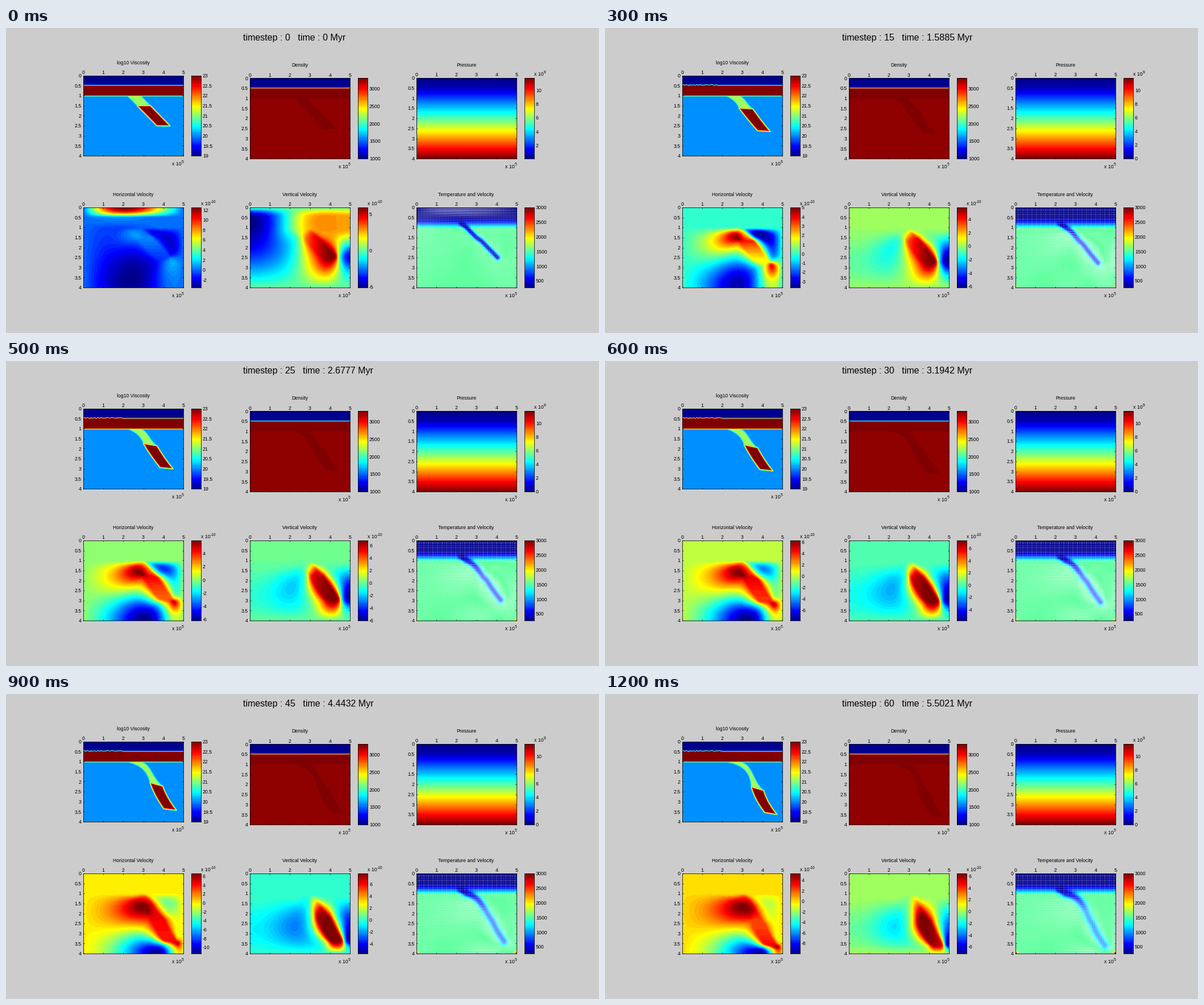
A matplotlib script that plays this animation: 1043 by 537 pixels, repeating every 1.3 s.

```python
from functools import lru_cache

import numpy as np
import matplotlib.pyplot as plt
from matplotlib.animation import FuncAnimation
from matplotlib.collections import LineCollection
from matplotlib.colors import ListedColormap

W, H, DPI = 1043, 537, 64
PX = 72 / DPI
NX, NY = 80, 64
LX, LY = 5.0, 4.0
TIMES = [0, .49918, 1.0439, 1.5885, 2.1331, 2.6777, 3.1942,
         3.6816, 4.0706, 4.4432, 4.8020, 5.1530, 5.5021]

# slab corners: top left, top right, bottom right, bottom left
SLAB_STEPS = [0, 5, 15, 35, 45, 60]
SLAB = np.array([
    [2.70, 1.50, 3.35, 1.50, 4.32, 2.50, 3.68, 2.50],
    [2.73, 1.53, 3.38, 1.53, 4.34, 2.61, 3.72, 2.58],
    [2.84, 1.62, 3.52, 1.66, 4.38, 2.78, 3.76, 2.74],
    [3.18, 1.87, 3.84, 2.05, 4.56, 3.21, 3.92, 3.13],
    [3.34, 2.05, 3.96, 2.22, 4.64, 3.42, 4.02, 3.34],
    [3.45, 2.26, 4.06, 2.44, 4.72, 3.63, 4.12, 3.53]])

# colour limits of the two velocity panels
LIM_STEPS = [0, 5, 15, 25, 35, 45, 60]
VX_LO = [-3.54, -2.63, -3.64, -6.17, -9.37, -11.4, -9.95]
VX_HI = [12.5, 3.99, 5.01, 5.98, 6.68, 6.64, 5.3]
VY_LO = [-5.1, -6.33, -6.17, -6.02, -5.57, -5.6, -7.15]
VY_HI = [5.9, 5.14, 5.78, 6.82, 7.75, 7.8, 6.45]


def jet64():
    i = np.arange(1, 65)

    def ramp(j):
        return np.clip(np.minimum(j, 48 - j) / 16, 0, 1)
    return ListedColormap(np.column_stack([ramp(i - 24), ramp(i - 8), ramp(i + 8)]))


JET = jet64()


# ---------- geometry ----------
def bezier(p0, p1, p2, p3, n=12):
    t = np.linspace(0, 1, n)[:, None]
    p0, p1, p2, p3 = map(np.asarray, (p0, p1, p2, p3))
    return ((1 - t)**3 * p0 + 3 * t * (1 - t)**2 * p1
            + 3 * t**2 * (1 - t) * p2 + t**3 * p3)


def mix(a, b, u):
    return np.asarray(a) * (1 - u) + np.asarray(b) * u


def edges(step):
    """Left and right edges of the weak neck and of the stiff slab."""
    u = step / 60
    c = [np.interp(step, SLAB_STEPS, col) for col in SLAB.T]
    tl, tr, br, bl = np.reshape(c, (4, 2))
    s = np.linspace(0, 1, 7)[:, None]
    sag = np.array([.08 * u, 0]) * 4 * s * (1 - s)
    neck_l = bezier((2.2, 1.0), mix((2.37, 1.17), (3.0, 1.15), u),
                    mix((2.53, 1.33), (3.4, 1.45), u), tl)
    neck_r = bezier((2.87, 1.0), mix((3.02, 1.17), (3.55, 1.15), u),
                    mix((3.18, 1.33), (3.5, 2.0), u), tr)
    return neck_l, neck_r, mix(tl, bl, s) - sag, mix(tr, br, s) - sag


def seg_dist(x, y, a, b):
    e = b - a
    t = np.clip(((x - a[0]) * e[0] + (y - a[1]) * e[1]) / (e @ e + 1e-12), 0, 1)
    return np.hypot(x - a[0] - t * e[0], y - a[1] - t * e[1])


def signed_dist(x, y, poly):
    d = np.full(x.shape, 99.0)
    inside = np.zeros(x.shape, bool)
    for a, b in zip(poly, np.roll(poly, -1, axis=0)):
        d = np.minimum(d, seg_dist(x, y, a, b))
        dy = b[1] - a[1]
        if dy:
            cross = (a[1] > y) != (b[1] > y)
            inside ^= cross & (x < a[0] + (y - a[1]) * (b[0] - a[0]) / dy)
    return np.where(inside, -d, d)


def cover(d, width):
    return np.clip(.5 - d / width, 0, 1)


def bodies(x, y, step):
    neck_l, neck_r, left, right = edges(step)
    neck = signed_dist(x, y, np.vstack([neck_l, neck_r[::-1]]))
    slab = signed_dist(x, y, np.vstack([left, right[::-1]]))
    return neck, slab


def log_viscosity(x, y, neck, slab, surface=.5):
    v = 20.05 + 1.05 * cover(neck, .08)
    v = np.maximum(v, 20.05 + 2.95 * cover(slab, .1))
    v = np.maximum(v, 20.05 + 2.95 * cover(y - 1.01, .06))
    return 19 + (v - 19) * cover(surface - y, .06)


def temperature(x, y, step):
    u = step / 60
    t = 273 + 1270 * np.clip((y - .5) / .53, 0, 1)**1.4
    neck_l, neck_r, left, right = edges(step)
    line = np.vstack([[(2.25, .8)], .55 * neck_l + .45 * neck_r,
                      (.42 * left + .58 * right)[1:]])
    d = np.full(x.shape, 99.0)
    for a, b in zip(line[:-1], line[1:]):
        d = np.minimum(d, seg_dist(x, y, a, b))
    depth = np.clip((y - .9) / 1.0, 0, 1)
    amp = 1150 - 560 * u * depth
    t = t - amp * np.exp(-(d / (.12 + .08 * u))**2) * np.clip(t / 1543, 0, 1)
    for cx in (0, LX):
        t = t + 1500 * u * np.exp(-((x - cx)**2 + (y - LY)**2) / .008)
    return np.maximum(t, 273)


# ---------- slow viscous flow, stream function ----------
def stream(eta, rho, pen):
    n = NY - 1
    eye = np.eye(n)
    lap = np.eye(n, k=1) + np.eye(n, k=-1) - 2 * eye
    diff = np.eye(n + 1, n) - np.eye(n + 1, n, -1)
    stretch = np.hstack([eye, -2 * eye - lap, eye])
    shear = 2 * np.hstack([-diff, diff, 0 * diff])
    lg = np.log(eta)
    cell = np.exp((lg[1:, 1:] + lg[:-1, 1:] + lg[1:, :-1] + lg[:-1, :-1]) / 4)

    a, b = np.zeros((3 * n, 3 * n)), np.zeros(3 * n)
    a[:n, :n] = 1e9 * eye
    mid = np.arange(n, 2 * n)
    parts = []
    for k in range(NX - 1):
        a += stretch.T @ (eta[k + 1, 1:-1, None] * stretch)
        a += shear.T @ (cell[k][:, None] * shear)
        a[mid, mid] += pen
        b[:n] -= rho[k + 1, 1:-1]
        b[2 * n:] += rho[k + 1, 1:-1]
        s = np.linalg.solve(a[:n, :n], np.column_stack([a[:n, n:], b[:n]]))
        parts.append(s)
        rest = np.column_stack([a[n:, n:], b[n:]]) - a[n:, :n] @ s
        a, b = np.zeros_like(a), np.zeros_like(b)
        a[:2 * n, :2 * n], b[:2 * n] = rest[:, :-1], rest[:, -1]

    psi = np.zeros((NX + 1, NY + 1))
    last = a[:n, :n] + 4 * diff.T @ (cell[-1][:, None] * diff)
    psi[NX - 1, 1:-1] = np.linalg.solve(last, b[:n])
    for k in range(NX - 2, -1, -1):
        s = parts[k]
        psi[k, 1:-1] = s[:, -1] - s[:, :-1] @ np.r_[psi[k + 1, 1:-1], psi[k + 2, 1:-1]]
    return psi


def fit(v, lo, hi):
    """Scale each sign on its own so that zero keeps its colour."""
    return np.where(v > 0, v * hi / v.max(), v * lo / v.min())


GX, GY = np.meshgrid(np.linspace(0, LX, NX + 1), np.linspace(0, LY, NY + 1), indexing='ij')
FX, FY = np.meshgrid((np.arange(176) + .5) / 176 * LX, (np.arange(141) + .5) / 141 * LY)
ROUGH = np.random.default_rng(4).random(60).repeat(3)[:176]
PRESSURE = np.interp(FY, [0, .5, 4], [0, .49, 11.85])
PRESSURE[:, 0] *= .5


@lru_cache(maxsize=None)
def state(k):
    step = 5 * k
    neck, slab = bodies(GX, GY, step)
    eta = 10**(log_viscosity(GX, GY, neck, slab) - 20)
    rho = np.maximum(cover(neck, .08), cover(slab, .08)) * (GY > .99)
    # once settled, the plate stays at rest
    pen = np.where(GY[0, 1:-1] < 1.001, 1e6 if k else 0, 0)
    psi = stream(eta, rho, pen)
    vx, vy = -np.gradient(psi, axis=1), np.gradient(psi, axis=0)
    lims = [np.interp(step, LIM_STEPS, v) for v in (VX_LO, VX_HI, VY_LO, VY_HI)]

    neck, slab = bodies(FX, FY, step)
    reach = 1.4 + .6 * min(step / 25, 1)
    surface = .48 - (.035 * ROUGH * (FX < reach) if k else 0)
    visc = log_viscosity(FX, FY, neck, slab, surface)
    heavy = np.maximum.reduce([cover(neck, .06), cover(slab, .06), cover(FY - 1, .04)])
    dens = 1000 + (2250 + 55 * heavy) * cover(.5 - FY, .07)
    return (visc, dens, fit(vx, *lims[:2]).T, fit(vy, *lims[2:]).T,
            temperature(FX, FY, step), lims)


# ---------- figure ----------
fig = plt.figure(figsize=(W / DPI, H / DPI), dpi=DPI, facecolor='#cccccc')


def text(x, y, s, size=8.8, ha='left'):
    return fig.text(x / W, 1 - y / H, s, fontsize=size * PX, ha=ha, va='baseline',
                    family='Liberation Sans', color='black')


def power(x, y, exp):
    text(x, y, 'x 10')
    text(x + 16.5, y - 4.5, exp, 6.6)


def frame_axes(x0, y0, x1, y1):
    ax = fig.add_axes([x0 / W, 1 - y1 / H, (x1 - x0) / W, (y1 - y0) / H])
    for sp in ax.spines.values():
        sp.set_linewidth(.8 * PX)
    ax.tick_params(which='both', direction='in', length=2 * PX, width=.7 * PX,
                   top=True, right=True, labelleft=False, labelbottom=False)
    return ax


def num(v):
    return f'{v:g}'


def bar_labels(x, y0, y1, lo, hi, step):
    first = np.ceil(lo / step - 1e-9)
    vals = np.arange(first, np.floor(hi / step + 1e-9) + 1) * step
    return [text(x + 3, y1 - (v - lo) / (hi - lo) * (y1 - y0) + 3.2, num(v + 0.0)) for v in vals]


def panel(x0, y0, y1, title, lo, hi, exp=None, nodes=False):
    x1 = x0 + 176
    ax = frame_axes(x0, y0, x1, y1)
    hx, hy = (LX / NX / 2, LY / NY / 2) if nodes else (0, 0)
    shape = (NY + 1, NX + 1) if nodes else FX.shape
    im = ax.imshow(np.zeros(shape), cmap=JET, vmin=lo, vmax=hi, aspect='auto',
                   extent=(-hx, LX + hx, LY + hy, -hy),
                   interpolation='bilinear' if nodes else 'nearest')
    ax.set(xlim=(0, LX), ylim=(LY, 0), xticks=range(6), yticks=np.arange(0, 4.1, .5))
    text((x0 + x1) / 2 - .5, y0 - 20, title, 8.6, 'center')
    for i in range(6):
        text(x0 + i * 35.2, y0 - 2.8, num(i), ha='center')
    for i in range(9):
        text(x0 - 3.5, y0 + i * (y1 - y0) / 8 + 3.2, num(i / 2), ha='right')
    power(x1 - 20, y1 + 17, '5')

    bar = frame_axes(x1 + 14, y0, x1 + 31, y1)
    bar.imshow(np.arange(64)[::-1, None], cmap=JET, aspect='auto', interpolation='nearest')
    bar.set(xticks=[], yticks=[])
    if exp:
        power(x1 + 31, y0 - 4, exp)
    return ax, im


COLS = (136, 429, 722)
_, visc_im = panel(COLS[0], 84, 225, 'log10 Viscosity', 19, 23)
_, dens_im = panel(COLS[1], 88.5, 230, 'Density', 1000, 3300)
_, pres_im = panel(COLS[2], 88, 230, 'Pressure', 0, 11.85, '9')
_, vx_im = panel(COLS[0], 316, 457, 'Horizontal Velocity', -1, 1, '-10', True)
_, vy_im = panel(COLS[1], 316, 457, 'Vertical Velocity', -1, 1, '-10', True)
temp_ax, temp_im = panel(COLS[2], 316, 457, 'Temperature and Velocity', 273, 3000)
pres_im.set_data(PRESSURE)
bar_labels(343, 84, 225, 19, 23, .5)
bar_labels(636, 88.5, 230, 1000, 3300, 500)
bar_labels(929, 316, 457, 273, 3000, 500)

QX, QY = np.meshgrid(np.linspace(0, LX, 67), np.linspace(0, LY, 54))
QI = np.rint(QX / LX * NX).astype(int)
QJ = np.rint(QY / LY * NY).astype(int)
arrows = LineCollection([], colors='white', linewidths=.9 * PX, alpha=.9)
temp_ax.add_collection(arrows, autolim=False)

head = text(417, 22, '', 16)
moving = []


def draw(k):
    visc, dens, vx, vy, temp, (xlo, xhi, ylo, yhi) = state(k)
    for im, data in ((visc_im, visc), (dens_im, dens), (vx_im, vx),
                     (vy_im, vy), (temp_im, temp)):
        im.set_data(data)
    vx_im.set_clim(xlo, xhi)
    vy_im.set_clim(ylo, yhi)

    scale = .11 / np.hypot(vx, vy).max()
    start = np.stack([QX, QY], -1)
    move = np.stack([vx[QJ, QI], vy[QJ, QI]], -1) * scale
    move[..., 0] += .028
    arrows.set_segments(np.stack([start, start + move], 2).reshape(-1, 2, 2))

    for t in moving:
        t.remove()
    moving[:] = (bar_labels(929, 88, 230, 0 if k else .03, 11.85, 2)
                 + bar_labels(343, 316, 457, xlo, xhi, 1 if xhi - xlo < 9.5 else 2)
                 + bar_labels(636, 316, 457, ylo, yhi, 2 if k else 5))
    head.set_text(f'timestep : {5 * k}   time : {TIMES[k]:.5g} Myr')
    return []


anim = FuncAnimation(fig, draw, frames=13, interval=100, repeat=True, blit=False)
plt.show()
```
